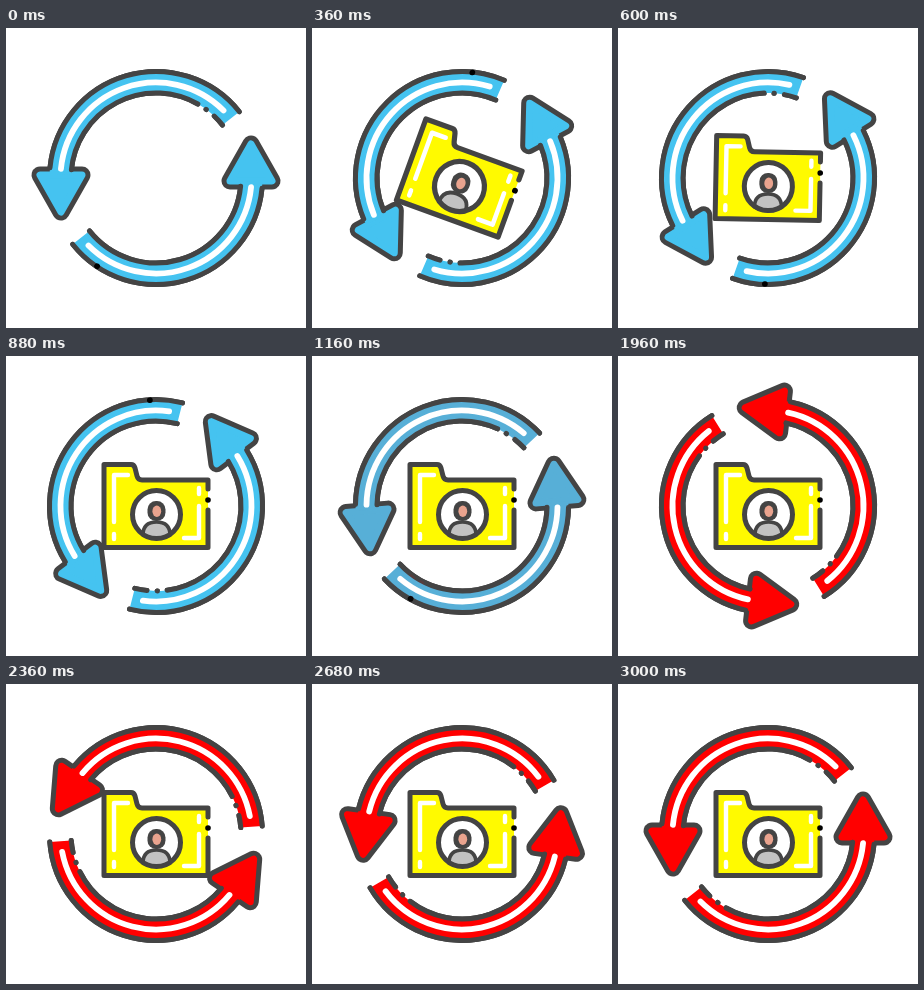
Recreate the animation shown at these times as an HTML page. Size 300 by 300 pixels, loop 4 s.

```html
<!DOCTYPE html>
<html>
<head>
<meta charset="utf-8">
<title>Folder sync</title>
<style>
  html, body { margin: 0; width: 100%; height: 100%; overflow: hidden; background: #fff; }
  svg { display: block; width: 100vw; height: 100vh; }
  .line { fill: none; stroke: #444; stroke-width: 5; stroke-linecap: round; stroke-linejoin: round; }
  .shine { fill: none; stroke: #fff; stroke-width: 4.4; stroke-linecap: round; stroke-linejoin: round; }
</style>
</head>
<body>
<svg viewBox="0 0 300 300">
  <g id="arrows">
    <g id="blue"></g>
    <g id="red"></g>
  </g>
  <g id="folder">
    <path fill="#fffa00" d="M98 191.5V108.5H125L133 124H202V191.5Z"/>
    <path class="line" d="M202 154V191.5H98V108.5H125Q128 108.5 129 112L131 120Q132 124 136 124H202V133"/>
    <circle cx="202" cy="144" r="2.8"/>
    <path class="shine" d="M108 166V119H122M108 178V183M193 132V138M193 150V182H178"/>
    <circle cx="150.5" cy="158.5" r="24" fill="#fff"/>
    <path d="M137 179Q137 166 150.5 166Q164 166 164 179Q150.5 186 137 179Z" fill="#c2c2c2" stroke="#444" stroke-width="3.6"/>
    <rect x="141.5" y="145" width="18" height="20" rx="8.5" fill="#444"/>
    <ellipse cx="150.8" cy="155.3" rx="4.4" ry="5.7" fill="#e9a38e"/>
    <circle class="line" cx="150.5" cy="158.5" r="24"/>
  </g>
</svg>
<script>
const LOOP = 4000, SPIN = 3000, STEP = 40;
const INNER = 85, MIDDLE = 95.5, OUTER = 106.5;
const TAIL = -38.5, NECK = -174.5;

const $ = id => document.getElementById(id);
const clamp = x => Math.min(1, Math.max(0, x));
const mix = (a, b, k) => a + (b - a) * k;

function polar(radius, degrees) {
  const a = degrees * Math.PI / 180;
  return [150 + radius * Math.cos(a), 150 + radius * Math.sin(a)].map(v => v.toFixed(2)).join(' ');
}

function arc(radius, from, to, start = 'M') {
  const sweep = to > from ? 1 : 0;
  return `${start}${polar(radius, from)}A${radius} ${radius} 0 0 ${sweep} ${polar(radius, to)}`;
}

const head = 'M34 147H76L55 184Z';
const shaft = arc(OUTER, TAIL, -178) + arc(INNER, -178, TAIL, 'L') + 'Z';
const solidEdge = arc(INNER, TAIL, NECK);
const dottedEdge = arc(INNER, TAIL, -46.8) + arc(INNER, -53.7, -53.9) + arc(INNER, -60.5, NECK);
const bead = `<path d="${arc(OUTER - 0.5, -56.2, -56.3)}" stroke="#000" stroke-width="5.6" stroke-linecap="round"/>`;

function arrow(color, innerEdge, turn, extra = '') {
  const edges = arc(OUTER, TAIL, NECK) + innerEdge;
  return `<g transform="rotate(${turn} 150 150)">
    <path d="${head}" fill="#444" stroke="#444" stroke-width="17" stroke-linejoin="round"/>
    <path class="line" d="${edges}"/>
    <path d="${head}" fill="${color}" stroke="${color}" stroke-width="7" stroke-linejoin="round"/>
    <path d="${shaft}" fill="${color}"/>
    <path class="line" d="${edges}"/>
    <path class="shine" style="stroke-width:5.8" d="${arc(MIDDLE, -45, NECK)}"/>
    ${extra}</g>`;
}

$('blue').innerHTML = arrow('#45c3f0', dottedEdge, 0) + arrow('#45c3f0', solidEdge, 180, bead);
$('red').innerHTML = arrow('#f00', dottedEdge, 0) + arrow('#f00', dottedEdge, 180);

function bezier(x1, y1, x2, y2) {
  const at = (s, a, b) => 3 * (1 - s) ** 2 * s * a + 3 * (1 - s) * s * s * b + s ** 3;
  return x => {
    let low = 0, high = 1;
    for (let i = 0; i < 30; i++) {
      const mid = (low + high) / 2;
      if (at(mid, x1, x2) < x) low = mid; else high = mid;
    }
    return at(low, y1, y2);
  };
}
const spinEase = bezier(0.13, 0.04, 0.288, 1);
const smooth = bezier(0.333, 0, 0.667, 1);

// time, scale, rotation
const pop = [[40, 0, -60], [360, 1.04, 20], [640, 1, 0]];

function popAt(t) {
  if (t <= pop[0][0]) return pop[0].slice(1);
  const i = pop.findIndex(p => t < p[0]);
  if (i < 0) return pop[pop.length - 1].slice(1);
  const [a, b] = [pop[i - 1], pop[i]];
  const k = smooth((t - a[0]) / (b[0] - a[0]));
  return [mix(a[1], b[1], k), mix(a[2], b[2], k)];
}

function draw(t) {
  const angle = t >= SPIN ? 0 : -1080 * spinEase(t / SPIN);
  $('arrows').setAttribute('transform', `rotate(${angle} 150 150)`);

  const fade = clamp((t - 1095) / 655);
  $('red').style.opacity = fade;
  $('blue').style.display = fade < 1 ? '' : 'none';

  const [scale, turn] = popAt(t);
  $('folder').style.display = scale > 0 ? '' : 'none';
  $('folder').setAttribute('transform',
    `translate(150 150) rotate(${turn}) scale(${scale}) translate(-150 -150)`);
}

const begin = performance.now();
function tick(now) {
  const t = Math.max(0, now - begin) % LOOP;
  draw(Math.floor(t / STEP) * STEP);
  requestAnimationFrame(tick);
}
draw(0);
requestAnimationFrame(tick);
</script>
</body>
</html>
```
